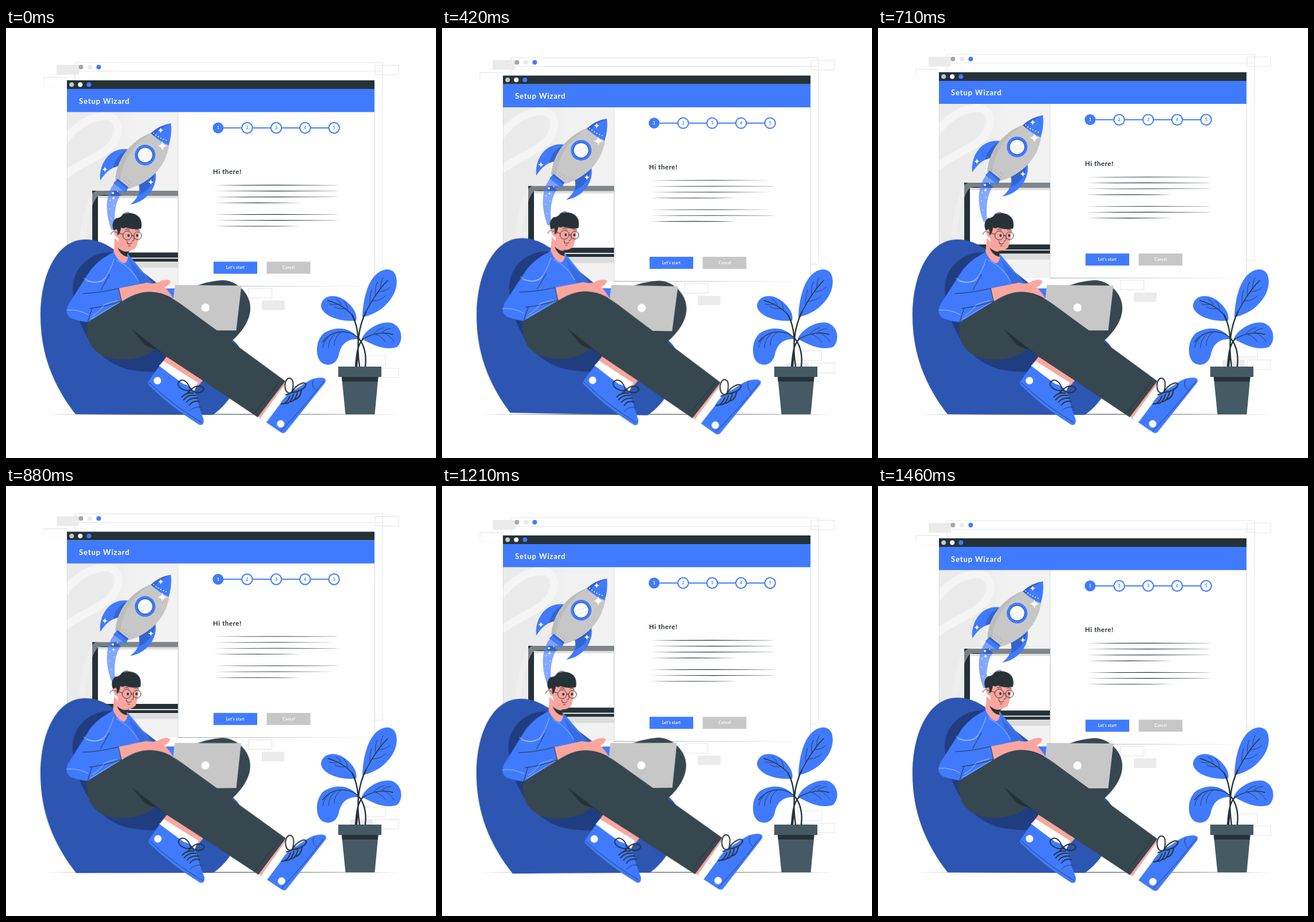
These frames come from a looping animation (748x748 px, 1500 ms). An HTML page without scripts:

```html
<!DOCTYPE html>
<html lang="en">
<head>
<meta charset="utf-8">
<title>Setup wizard</title>
<style>
  html, body { margin: 0; width: 100%; height: 100%; overflow: hidden; background: #fff; }
  svg { display: block; width: 100vw; height: 100vh; }
  text { font-family: Lato, "Open Sans", sans-serif; font-weight: 700; }
  .blue { fill: #407bff; }
  .ink { fill: #263238; }
  .skin { fill: #faa69e; }
  .cloth { fill: #37474f; }
  .gray { fill: #c7c7c7; }
  .pale { fill: #ebebeb; }
  .white { fill: #fff; }
  .pot { fill: #455a64; }
  .line { fill: none; stroke: #263238; stroke-linecap: round; stroke-linejoin: round; }
  .frame { fill: none; stroke: #ebebeb; stroke-width: 1.4; }
  .thread { fill: none; stroke: #fff; stroke-width: .7; opacity: .75; }
  .mid { text-anchor: middle; }
  #screen { animation: float 1.5s -20ms linear infinite; }
  #person { transform-origin: 308px 512px; animation: sway 1.5s -20ms linear infinite; }
  @keyframes float {
    0%, 100% { transform: translateY(.5px); }
    50% { transform: translateY(-14.5px); }
  }
  @keyframes sway {
    0%, 100% { transform: rotate(0deg); }
    25% { transform: rotate(1deg); }
    75% { transform: rotate(-1deg); }
  }
</style>
</head>
<body>
<svg viewBox="0 0 748 748">
  <defs>
    <path id="rule" class="ink" d="M362 0Q471-1.1 580 0Q471 1.1 362 0Z"/>
    <path id="shortRule" class="ink" d="M362 0Q437-1.1 513 0Q437 1.1 362 0Z"/>
    <path id="spark" class="white" d="M0-5Q.6-.6 5 0Q.6.6 0 5Q-.6.6-5 0Q-.6-.6 0-5Z"/>
    <circle id="step" r="9.2" fill="#fff" stroke="#407bff" stroke-width="2"/>
    <linearGradient id="wall"><stop offset=".35" stop-color="#ebebeb"/><stop offset=".6" stop-color="#f2f2f2"/></linearGradient>
    <linearGradient id="fade"><stop stop-color="#263238" stop-opacity=".6"/><stop offset="1" stop-color="#263238" stop-opacity="0"/></linearGradient>
    <linearGradient id="fadeDown" x2="0" y2="1"><stop stop-color="#e0e0e0"/><stop offset="1" stop-color="#e0e0e0" stop-opacity=".2"/></linearGradient>
    <clipPath id="panel"><path d="M106 146H299.5V449H106Z"/></clipPath>
  </defs>
  <rect class="white" width="748" height="748"/>

  <g id="screen">
    <path class="frame" d="M120 60H655V419H120ZM120 75H655"/>
    <rect class="pale" x="88" y="64" width="39.5" height="17"/>
    <path d="M106 86H66V102H106" fill="none" stroke="url(#fadeDown)"/>
    <path class="frame" d="M642 64.5H683V81H642ZM619 570H660V586.5H619ZM642 591.5H683V608H642Z"/>
    <path class="frame" d="M422 453H462.5V469.5H422Z"/>
    <path class="pale" d="M445 474h39.5v16.5h-39.5ZM599 591h39v17h-39Z"/>
    <circle cx="130.3" cy="68" r="4" fill="#a6a6a6"/>
    <circle cx="146" cy="68" r="4" class="pale"/>
    <circle cx="161.3" cy="68" r="4" class="blue"/>

    <path class="white" d="M106 91H641V449H106Z"/>
    <path d="M641 146V449" stroke="#263238" stroke-width=".6" opacity=".35"/>
    <rect x="299" y="448.700" width="342" height=".8" fill="url(#fade)"/>

    <g clip-path="url(#panel)">
      <rect x="106" y="146" width="194" height="303" fill="url(#wall)"/>
      <path d="M100 198C125 165 150 153 177 153C198 158 199 180 188 198C170 224 125 235 100 258" fill="none" stroke="#f5f5f5" stroke-width="14"/>
      <path d="M150 283H299.5V406.5H150Z" class="ink"/>
      <path d="M160 292H299.5V390.5H160Z" class="white"/>
      <path d="M160 292H299.5V296H160Z" fill="#e0e0e0"/>
      <path d="M150 399.5H299.5V401.200H150Z" class="white"/>
      <path d="M150 408H299.5V417H150Z" fill="#dcdcdc"/>
      <path d="M192 283H299.5V292H200Q197 287 192 283Z" fill="#f5f5f5" opacity=".43"/>
      <path d="M132 375C137 330 144 303 155 290Q164 283 184 287" fill="none" stroke="#f5f5f5" stroke-width="10" opacity=".4"/>
      <path d="M188 270L204 283C190 300 187 325 190 350L184 352C173 325 171 292 188 270Z" class="blue" opacity=".65"/>
      <g class="white">
        <circle cx="181" cy="300" r=".9"/><circle cx="180" cy="315" r=".8"/><circle cx="194" cy="284" r=".9"/>
        <circle cx="183" cy="331" r=".8"/><circle cx="188" cy="309" r=".8"/>
      </g>
    </g>
    <path d="M106.4 146V449M299.5 146V449" stroke="#263238" stroke-width=".5" opacity=".25"/>

    <g id="rocket">
      <path class="blue" d="M214 211C178 206 161 239 164 265C174 249 185 242 197 240ZM259 246C267 273 246 303 216 307C229 297 234 286 231 272Z"/>
      <path d="M214 211C199 216 190 228 186 243L198 239ZM259 246L231 272Q234 281 231 291C248 284 260 267 259 246Z" fill="#3464cf"/>
      <path class="gray" d="M253 182C216 197 194 226 190 263L213 280C250 269 278 242 284 203Z"/>
      <path d="M253 182C216 197 194 226 190 263L198 268C202 231 220 203 253 182Z" fill="#bcbcbc"/>
      <path class="blue" d="M252 183Q267 169 287 166Q289 186 283 204Q267 198 252 183Z"/>
      <path d="M252 183Q267 169 287 166Q264 175 257 188Z" fill="#3464cf"/>
      <path d="M194 262L213 277L208 286L187 270Z" fill="#3464cf"/>
      <path d="M192 265L211 280L208 286L187 270Z" class="blue"/>
      <circle cx="242" cy="221" r="18" class="blue"/>
      <circle cx="242" cy="221" r="14" fill="#3464cf"/>
      <circle cx="242" cy="221" r="12.5" class="white"/>
      <path d="M231 224L252 216M234 229L254 221" stroke="#ededed" stroke-width="2"/>
      <path d="M257 183Q267 192 281 196" fill="none" stroke="#fff" stroke-width="2" stroke-linecap="round" stroke-dasharray="0 5"/>
      <path d="M198 261Q208 266 216 275M204 260Q212 264 218 270" fill="none" stroke="#8f8f8f" stroke-width="1.4" stroke-linecap="round" stroke-dasharray="0 5"/>
      <use href="#spark" x="269" y="178"/>
      <use href="#spark" transform="translate(272 205) scale(1.65)"/>
      <use href="#spark" x="172" y="246"/>
      <use href="#spark" x="252" y="268"/>
      <use href="#spark" transform="translate(187 296) scale(.6)"/>
      <use href="#spark" transform="translate(186 287) scale(.6)"/>
    </g>

    <path class="ink" d="M106 91H641V106H106Z"/>
    <path class="blue" d="M106 106H641V146.2H106Z"/>
    <circle cx="114.2" cy="98.5" r="4" class="gray"/>
    <circle cx="129.2" cy="98.5" r="4" class="white"/>
    <circle cx="144.3" cy="98.5" r="4" class="blue"/>
    <text x="127" y="131.5" class="white" font-size="13" letter-spacing=".85">Setup Wizard</text>

    <path d="M369 173.7H570" stroke="#407bff" stroke-width="2"/>
    <circle cx="369" cy="173.7" r="9.5" class="blue"/>
    <use href="#step" x="419.5" y="173.7"/><use href="#step" x="470" y="173.7"/>
    <use href="#step" x="520.3" y="173.7"/><use href="#step" x="570.7" y="173.7"/>
    <g class="blue mid" font-size="7">
      <text x="369" y="176.2" class="white">1</text><text x="419.5" y="176.2">2</text>
      <text x="470" y="176.2">3</text><text x="520.3" y="176.2">4</text><text x="570.7" y="176.2">5</text>
    </g>
    <text x="360" y="254.3" class="ink" font-size="11.5" letter-spacing=".55">Hi there!</text>
    <use href="#rule" y="273.3"/><use href="#rule" y="283.5"/><use href="#rule" y="293.8"/><use href="#shortRule" y="304"/>
    <use href="#rule" y="324.3"/><use href="#rule" y="334.5"/><use href="#shortRule" y="344.7"/>
    <path class="blue" d="M361 406.3H437V427.3H361Z"/>
    <path class="gray" d="M453.5 406.3H529.5V427.3H453.5Z"/>
    <g class="white mid" font-size="6.8" letter-spacing=".25">
      <text x="399" y="419">Let’s start</text><text x="492" y="419">Cancel</text>
    </g>
  </g>

  <path class="ink" d="M65 672Q374 670.8 684 672Q374 673.2 65 672Z"/>

  <g id="plant">
    <g class="blue">
      <path d="M620 503C621 468 632 424 661 420C684 418 684 450 671 469C657 490 638 499 620 503Z"/>
      <path d="M609 509C574 512 547 497 548 482C551 465 572 461 590 474C604 485 612 498 609 509Z"/>
      <path d="M619 541C625 524 652 509 671 513C690 520 692 545 680 555C657 562 637 550 619 541Z"/>
      <path d="M614 541C592 540 583 551 579 568C575 585 561 590 549 582C537 572 538 542 554 530C574 518 600 520 614 541Z"/>
    </g>
    <g class="line" stroke-width="2.4">
      <path d="M615 589C609 550 613 520 626 494M610 589C612 563 618 529 602 499M625 589C628 563 620 547 612 538M608 589C610 567 611 552 621 541"/>
      <path stroke-width="1.4" d="M626 494C637 473 649 454 664 439M602 499C589 485 574 478 560 474M621 541C640 530 656 528 673 533M612 538C595 524 566 525 551 546"/>
      <path stroke-width=".8" d="M633 481Q632 467 636 456M643 466Q641 450 646 442M652 453Q651 443 656 434M637 475Q651 475 660 466M648 459Q659 459 668 451M594 490Q594 481 587 474M583 482Q581 475 574 471M591 488Q580 490 571 485M579 480Q569 483 562 480M640 532Q648 523 658 521M653 529Q662 523 669 523M641 532Q655 537 660 546M656 529Q669 536 675 546M583 529Q570 539 571 552M572 532Q561 542 561 556M562 537Q553 544 551 556"/>
    </g>
    <path class="pot" d="M584 607H647.5L641.5 672H590.5Z"/>
    <path class="ink" d="M584 606H647.5L646.8 615H584.7Z"/>
    <path class="pot" d="M578 589H653V607H578Z"/>
  </g>

  <g id="person">
    <path d="M121 672C82 622 60 566 60 501C60 430 88 368 138 368C169 368 190 386 214 406L380 535Q398 540 410 562C416 610 391 651 360 673Z" fill="#2d56b2"/>
    <path d="M192 391C153 385 116 413 116 454C119 508 149 579 213 594Q247 601 283 597L300 540Z" fill="#203d80"/>
    <path class="cloth" d="M322 452Q350 440 377 438.5C405 440 425 464 425 487C425 511 407 532 391 546L340 510Z"/>
    <path class="gray" d="M294 447L409.5 448L400.5 526H366L288 478Z"/>
    <circle cx="347" cy="486.5" r="7.2" class="white"/>

    <g id="leftFoot">
      <path class="skin" d="M282 568L344 611L334 623L273 580Z"/>
      <path class="white" d="M274 579L334 617L327 633L266 588Z"/>
      <path class="blue" d="M267 588L307 619Q326 622 331 641Q336 661 344 681Q345 693 336 690Q286 659 247 620Q246 617 249 613Z"/>
      <path class="line" stroke-width=".8" d="M249 617Q290 656 340 686M319 667Q327 657 339 660"/>
      <circle cx="263.5" cy="613.5" r="6.5" class="white"/>
      <path class="line" stroke-width="2" d="M321 630C309 633 296 623 300 616C308 607 318 617 321 630C331 618 345 623 344 629C339 638 327 633 321 630L314 637M306 642Q314 633 326 635M309 647Q317 637 329 639M314 651Q321 642 333 644M319 656Q326 647 336 650"/>
    </g>

    <g id="rightFoot">
      <path class="skin" d="M479 610L487 618L444 680L437 674Z"/>
      <path class="white" d="M487 617L502 628L458 689L443 678Z"/>
      <path class="blue" d="M453 686L477 654Q484 641 499 630C517 623 527 607 549 608Q559 609 555 617L488 701Q484 707 478 703Z"/>
      <path class="line" stroke-width=".8" d="M478 701Q519 659 553 614M535 611Q530 622 539 630"/>
      <circle cx="478" cy="688.5" r="6.5" class="white"/>
      <path class="line" stroke-width="2" d="M497 634C483 640 482 612 492 609C501 608 501 622 497 634C505 618 522 614 522 620C520 629 506 633 497 634L487 638M479 654Q489 654 494 640M486 653Q496 653 500 637M494 650Q503 650 507 634M502 646Q511 645 514 631"/>
    </g>

    <path class="cloth" d="M141 512L197 477Q228 455 261 460Q283 466 304 481L486 614L438 677L342 613L278 571L260 556Q243 577 200 577C160 576 136 553 141 512Z"/>
    <path class="ink" d="M218 523L286 576L262 559Q248 556 241 551Z"/>
    <path class="line" stroke-width="1" d="M434 668L477 614M261 460Q285 466 306 482L366 526"/>

    <path class="blue" d="M278 453L293 453L291 472Z"/>
    <path class="blue" d="M187 390C164 402 155 411 145 424L108 482Q101 498 113 505Q126 510 142 512L200 476L257 447L212 393Z"/>
    <path d="M214 403L257 447L236 449Q222 427 214 403Z" fill="#3464cf" opacity=".65"/>
    <path class="skin" d="M196 453L245 443Q258 447 269 440Q281 436 286 440Q285 447 276 451Q285 460 292 472Q277 462 261 460Q232 455 201 476Z"/>
    <path class="line" stroke-width="1" d="M134 462Q164 461 196 453L201 475M180 429L165 456M145 488Q173 485 201 475M142 512Q146 498 150 487"/>
    <path class="thread" d="M135 435Q153 448 170 439Q183 420 188 401M139 440Q160 447 174 434M193 404Q218 417 230 440M150 501Q164 493 171 481L194 474M147 507Q176 490 198 477M105 491Q126 489 143 499"/>

    <path class="skin" d="M189 365L187 389Q196 409 207 409Q214 403 212 390Z"/>
    <path class="skin" d="M194 337Q184 346 188 357Q190 364 195 365L197 380Q211 394 226 382Q232 368 233 338Z"/>
    <path class="ink" d="M194 382Q206 393 216 387Q209 393 212 398Q200 397 194 382Z"/>
    <path class="ink" d="M187 352Q182 339 191 331Q199 331 203 324Q217 319 228 326Q238 333 235 349Q220 352 208 347Q204 350 200 347Q199 355 195 361L193 350Z"/>
    <g class="line" stroke-width="1">
      <path d="M182 359Q184 354 188 354M203 325Q207 320 214 321M190 355Q195 355 194 360M197 357L203 359M218.5 361L222 361M207 351Q211 348 215 352M225 352Q229 349 232 353M222 362Q225 371 219 371M211 374Q214 378 219 374M210 371L212 376M213 379L216 379"/>
      <circle cx="211" cy="361" r="7.8"/><circle cx="229" cy="361.5" r="6.8"/>
    </g>
    <ellipse cx="213" cy="361" rx="1.9" ry="2.6" class="ink"/>
    <ellipse cx="228" cy="361" rx="1.9" ry="2.6" class="ink"/>
  </g>
</svg>
</body>
</html>
```
